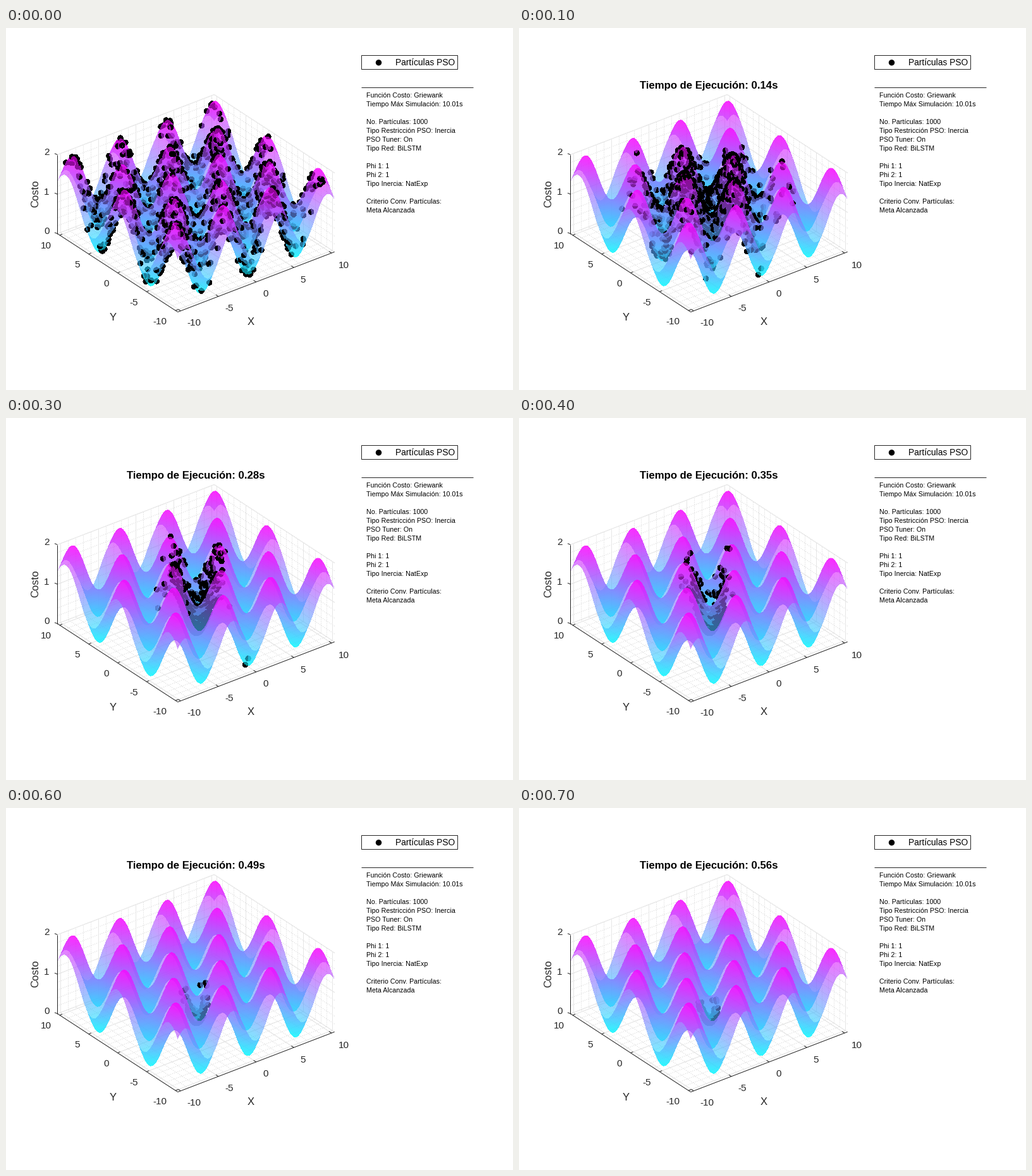
A matplotlib script that plays this animation: 802x573 px, repeating every 800 ms.

```python
import numpy as np
import matplotlib.pyplot as plt
from matplotlib.animation import FuncAnimation
from matplotlib.patches import Circle, Rectangle

W, H, DPI = 802, 573, 64
PX = 72 / DPI                       # points per pixel
INK = "#262626"
FRAMES, INTERVAL = 8, 100

# Orthographic camera
AZ, EL = np.radians(37.5), np.radians(30)
LIM = 10.39                         # half range of x and y
UNIT, ZUNIT = 15.04, 72.2           # pixels per data unit
CX, CY = 300.5, 340.0               # screen place of the data origin
SCALE = np.array([UNIT, UNIT, ZUNIT])
RIGHT = np.array([np.cos(AZ), -np.sin(AZ), 0])
UP = np.array([np.sin(EL) * np.sin(AZ), np.sin(EL) * np.cos(AZ), np.cos(EL)])
INTO = np.array([np.cos(EL) * np.sin(AZ), np.cos(EL) * np.cos(AZ), -np.sin(EL)])

ALPHA = 0.6
LAYERS = 8
DOT_RADIUS = 4.7
LEFT, TOP, VIEW_W, VIEW_H = 78, 102, 446, 330


def cost(x, y):
    return 1 + (x * x + y * y) / 4000 - np.cos(x) * np.cos(y / np.sqrt(2))


def project(x, y, z):
    p = np.stack(np.broadcast_arrays(x, y, z), -1) * SCALE
    return CX + p @ RIGHT, CY - p @ UP, p @ INTO


def trace_surface():
    """Depth and colour of every surface layer met by each pixel's ray."""
    py, px = np.mgrid[TOP:TOP + VIEW_H, LEFT:LEFT + VIEW_W] + 0.5
    sx, sy = (px - CX).ravel(), (CY - py).ravel()
    base = [(sx * RIGHT[i] + sy * UP[i]) / SCALE[i] for i in range(3)]
    step = INTO / SCALE
    n = sx.size
    depth = np.full((LAYERS, n), np.inf)
    color = np.zeros((LAYERS, n, 3))
    count = np.zeros(n, int)

    def point(t, sel=slice(None)):
        return [base[i][sel] + step[i] * t for i in range(3)]

    dt, prev = 2.0, None
    for t in np.arange(-268, 196, dt):
        x, y, z = point(t)
        gap = z - cost(x, y)
        if prev is not None:
            hit = np.flatnonzero((gap > 0) != (prev > 0))
            th = t - dt * gap[hit] / (gap[hit] - prev[hit])
            x, y, z = point(th, hit)
            ok = (abs(x) <= LIM) & (abs(y) <= LIM) & (count[hit] < LAYERS)
            hit, th = hit[ok], th[ok]
            v = np.clip(z[ok] / 2.05, 0, 1)
            depth[count[hit], hit] = th
            color[count[hit], hit] = np.stack([v, 1 - v, np.ones_like(v)], -1)
            count[hit] += 1
        prev = gap
    return (depth.reshape(LAYERS, VIEW_H, VIEW_W),
            color.reshape(LAYERS, VIEW_H, VIEW_W, 3))


DEPTH, COLOR = trace_surface()

rng = np.random.default_rng(12)
START = rng.uniform(-10, 10, (1000, 2))
PULL = rng.uniform(0.08, 0.88, (1000, 2))
RATE = rng.uniform([0.32, 0.24], [1.05, 1.0], (1000, 2))
TRAPPED = [(-0.3, -8.9), (0.4, -8.5)]


def swarm(k):
    """The swarm jumps towards the centre, then decays at its own rates."""
    if k == 0:
        return START
    pos = START * PULL * np.exp(-RATE * (k - 1))
    if k <= 3:
        pos[:2] = TRAPPED
    return pos


def dot_depth(pos):
    """Depth of the nearest dot at each pixel."""
    x, y = pos.T
    sx, sy, d = project(x, y, cost(x, y))
    sx, sy = sx - LEFT, sy - TOP
    near = np.full((VIEW_H, VIEW_W), np.inf)
    reach = range(-5, 6)
    for dy in reach:
        for dx in reach:
            ix, iy = np.floor(sx).astype(int) + dx, np.floor(sy).astype(int) + dy
            ok = np.hypot(ix + 0.5 - sx, iy + 0.5 - sy) <= DOT_RADIUS
            ok &= (ix >= 0) & (ix < VIEW_W) & (iy >= 0) & (iy < VIEW_H)
            np.minimum.at(near, (iy[ok], ix[ok]), d[ok])
    return near


def render(k):
    """Blend surface layers and dots from back to front."""
    dots = dot_depth(swarm(k))
    todo = np.isfinite(dots)
    rgb = np.zeros((VIEW_H, VIEW_W, 3))
    cover = np.zeros((VIEW_H, VIEW_W))
    for depth, color in zip(DEPTH[::-1], COLOR[::-1]):
        black = todo & (dots >= depth)
        rgb[black], cover[black] = 0, 1
        todo &= ~black
        a = ALPHA * np.isfinite(depth)
        rgb = rgb * (1 - a[..., None]) + color * a[..., None]
        cover = cover * (1 - a) + a
    rgb[todo], cover[todo] = 0, 1
    rgb /= np.maximum(cover, 1e-6)[..., None]
    return np.clip(np.dstack([rgb, cover]), 0, 1)


plt.rcParams["font.family"] = "Liberation Sans"
fig = plt.figure(figsize=(W / DPI, H / DPI), dpi=DPI, facecolor="white")
ax = fig.add_axes([0, 0, 1, 1])
ax.set_xlim(0, W)
ax.set_ylim(H, 0)
ax.axis("off")


def text(x, y, s, size, color=INK, ha="center", **kw):
    """Text whose capitals are centred on y."""
    return ax.text(x, y + 0.36 * size, s, fontsize=size * PX, color=color,
                   ha=ha, va="baseline", **kw)


def line(xs, ys, color=INK, **kw):
    ax.plot(xs, ys, color=color, lw=PX, solid_capstyle="butt", **kw)


def line3d(a, b, **kw):
    (x0, y0, _), (x1, y1, _) = project(*a), project(*b)
    line([x0, x1], [y0, y1], **kw)


def grid(values, zvalues, **style):
    for v in values:
        line3d((v, -LIM, 0), (v, LIM, 0), **style)
        line3d((v, LIM, 0), (v, LIM, 2), **style)
        line3d((-LIM, v, 0), (LIM, v, 0), **style)
        line3d((LIM, v, 0), (LIM, v, 2), **style)
    for z in zvalues:
        line3d((-LIM, LIM, z), (LIM, LIM, z), **style)
        line3d((LIM, -LIM, z), (LIM, LIM, z), **style)


grid(range(-10, 11), np.arange(0, 2.01, 0.2), color="#d4d4d4",
     linestyle=(0, (1, 2)), zorder=1)
grid(range(-10, 11, 5), (0, 1, 2), color="#e6e6e6", zorder=1.1)

# Axis lines, ticks and labels
line3d((-LIM, LIM, 0), (-LIM, LIM, 2), zorder=2)
line3d((-LIM, LIM, 0), (-LIM, -LIM, 0), zorder=2)
line3d((-LIM, -LIM, 0), (LIM, -LIM, 0), zorder=2)
for v in range(-10, 11, 5):
    x, y, _ = project(v, -LIM, 0)
    line([x, x - 4], [y, y - 2.6], zorder=2)
    text(x + 10.5, y + 18, str(v), 15.2, ha="left")
    x, y, _ = project(-LIM, v, 0)
    line([x, x + 4], [y, y - 1.6], zorder=2)
    text(x - 13.5, y + 16, str(v), 15.2, ha="right")
for v in range(3):
    x, y, _ = project(-LIM, LIM, v)
    line([x, x - 4.5], [y, y - 1.8], zorder=2)
    text(64.5, y - 5, str(v), 15.2)
text(387.5, 464, "X", 16.67)
text(169.5, 457, "Y", 16.67)
ax.text(51, 262, "Costo", fontsize=16.67 * PX, color=INK, rotation=90,
        rotation_mode="anchor", ha="center", va="baseline")

# Legend and settings; whole coordinates snap to single pixel rows
ax.add_patch(Rectangle((562, 43), 152, 22, fc="white", ec=INK, lw=PX))
ax.add_patch(Circle((589.5, 54.8), 4.7, fc="black", lw=0))
text(616, 54.5, "Partículas PSO", 13.75, "black", "left")
line([562, 739], [94, 94])
SETTINGS = [
    "Función Costo: Griewank", "Tiempo Máx Simulación: 10.01s", "",
    "No. Partículas: 1000", "Tipo Restricción PSO: Inercia",
    "PSO Tuner: On", "Tipo Red: BiLSTM", "",
    "Phi 1: 1", "Phi 2: 1", "Tipo Inercia: NatExp", "",
    "Criterio Conv. Partículas:", "Meta Alcanzada",
]
for i, row in enumerate(SETTINGS):
    text(570, 106 + 14 * i, row, 10.65, "black", "left")

title = text(300.5, 90, "", 16.7, "black", weight="bold")
view = ax.imshow(render(0), extent=(LEFT, LEFT + VIEW_W, TOP + VIEW_H, TOP),
                 interpolation="nearest", aspect="auto", zorder=3)
ax.set_xlim(0, W)
ax.set_ylim(H, 0)


def update(k):
    view.set_data(render(k))
    title.set_text(f"Tiempo de Ejecución: {0.07 * (k + 1):.2f}s" if k else "")
    return view, title


anim = FuncAnimation(fig, update, frames=FRAMES, interval=INTERVAL,
                     repeat=True, repeat_delay=0, blit=False)
plt.show()
```
